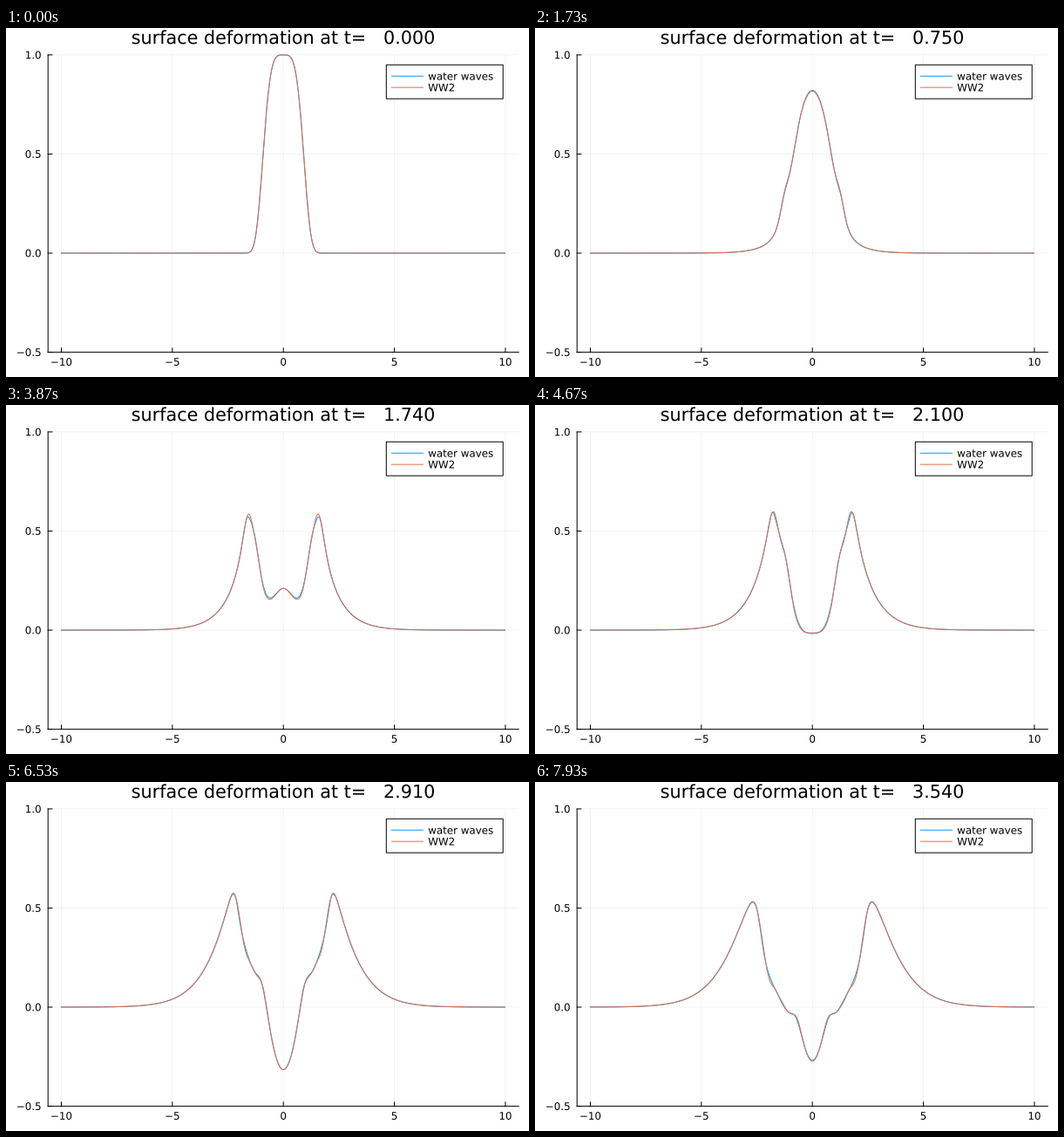
A matplotlib script for the animation above (8 s loop, 600 by 400 pixels).

```python
import numpy as np
import matplotlib.pyplot as plt
from matplotlib.animation import FuncAnimation
from matplotlib.patches import PathPatch, Rectangle
from matplotlib.textpath import TextPath

# ---- Wave models: depth 1, gravity 1, nonlinearity EPS ----
N, L, EPS = 1024, 10.0, 0.25
DT, STEPS, FRAMES = 0.01, 3, 120

grid = -L + 2 * L / N * np.arange(N)
k = 2 * np.pi * np.fft.fftfreq(N, 2 * L / N)
keep = (np.abs(k) < np.abs(k).max() * 2 / 3).astype(float)
k_safe = np.where(k == 0, 1, k)
ddx = 1j * k * keep
dtn = k * np.tanh(k) * keep
rect = np.minimum(1, 1 / np.abs(0.1 * k_safe))  # smoothing of high modes


def op(symbol, f):
    return np.fft.ifft(symbol * np.fft.fft(f)).real


def conjugate(depth):
    return np.where(k == 0, 0, -1j * keep / np.tanh(k_safe * depth))


def bell(x):
    return np.exp(-x ** 4)


def surface_x(y):
    return grid + op(conjugate(1 + y.mean()), y)


def full_rhs(state):
    """Full water waves in conformal variables."""
    y, phi = state
    depth = 1 + y.mean()
    conj = conjugate(depth)
    y_xi = op(ddx, y)
    x_xi = 1 + op(ddx * conj, y)
    phi_xi = op(ddx, phi)
    phi_n = op(k * np.tanh(k * depth) * keep, phi)
    jac = x_xi ** 2 + y_xi ** 2
    b = phi_n / jac
    a = op(conj, b)
    y_t = a * y_xi + b * x_xi
    phi_t = -y + a * phi_xi + 0.5 * (phi_n ** 2 - phi_xi ** 2) / jac
    return np.array([op(keep, y_t), op(keep, phi_t)])


def quadratic_rhs(state):
    """Second-order expansion of the water waves system."""
    zeta, psi = state
    smooth = op(rect, zeta)
    psi_x, psi_n = op(ddx, psi), op(dtn, psi)
    zeta_t = psi_n - EPS * (op(ddx, smooth * psi_x) + op(dtn, smooth * psi_n))
    psi_t = -zeta - EPS / 2 * op(rect * keep, psi_x ** 2 - psi_n ** 2)
    return np.array([zeta_t, psi_t])


def rk4(rhs, s):
    a = rhs(s)
    b = rhs(s + DT / 2 * a)
    c = rhs(s + DT / 2 * b)
    d = rhs(s + DT * c)
    return s + DT / 6 * (a + 2 * b + 2 * c + d)


def solve(rhs, height):
    state = np.array([height, np.zeros(N)])
    out = [height]
    for _ in range(FRAMES - 1):
        for _ in range(STEPS):
            state = rk4(rhs, state)
        out.append(state[0])
    return out


y0 = EPS * bell(grid)
for _ in range(60):
    y0 = EPS * bell(surface_x(y0))

full = [(surface_x(y), y / EPS) for y in solve(full_rhs, y0)]
quadratic = solve(quadratic_rhs, bell(grid))

# ---- Stage, drawn in pixels with y measured from the top ----
W, H = 600, 400
LEFT, RIGHT, TOP, BOTTOM = 48.2, 588.2, 30.87, 371.61
BLUE, ORANGE = "#009AFA", "#E36F47"
SMALL, LARGE = 11.853, 20.74

fig = plt.figure(figsize=(W / 100, H / 100), dpi=100, facecolor="white")
ax = fig.add_axes([0, 0, 1, 1])
ax.set_xlim(0, W)
ax.set_ylim(0, H)
ax.axis("off")


def px(x):
    return LEFT + (x + 10.6) / 21.2 * (RIGHT - LEFT)


def py(y):
    return BOTTOM - (y + 0.5) / 1.5 * (BOTTOM - TOP)


def line(xs, ys, color="black", width=1.0, **kw):
    # widths are in pixels
    return ax.plot(xs, H - np.asarray(ys), color=color, lw=width * 0.72,
                   snap=False, **kw)[0]


def text_path(x, base, s, size):
    return TextPath((x, H - base), s, size=size, prop={"family": "DejaVu Sans"})


def text(x, base, s, size=SMALL):
    patch = PathPatch(text_path(x, base, s, size), fc="black", lw=0, zorder=6)
    return ax.add_patch(patch)


def advance(s):
    return SMALL * sum({"−": 0.838, ".": 0.318}.get(c, 0.636) for c in s)


for v in (-10, -5, 0, 5, 10):
    x = px(v)
    label = str(v).replace("-", "−")
    line([x, x], [TOP, BOTTOM], width=0.5, alpha=0.1)
    line([x, x], [BOTTOM, BOTTOM - 4.72])
    text(x - advance(label) / 2, 386.9, label)

for v in (-0.5, 0.0, 0.5, 1.0):
    y = py(v)
    label = str(v).replace("-", "−")
    line([LEFT, RIGHT], [y, y], width=0.5, alpha=0.1)
    line([LEFT, LEFT + 4.72], [y, y])
    text(40.6 - advance(label), y + 4.32, label)

line([LEFT, RIGHT], [BOTTOM, BOTTOM])
line([LEFT, LEFT], [TOP, BOTTOM])

full_line = line([], [], BLUE, zorder=3)
quad_line = line([], [], ORANGE, zorder=4)

ax.add_patch(Rectangle((436.3, H - 81.1), 133.9, 38.88, fc="white", ec="black",
                       lw=0.72, snap=False, zorder=5))
for y, color, label in ((55.18, BLUE, "water waves"), (68.14, ORANGE, "WW2")):
    line([442.4, 478.4], [y, y], color, zorder=6)
    text(484.2, y + 4.32, label)

title = text(143.7, 18.14, "t", LARGE)


def update(i):
    x, z = full[i]
    full_line.set_data(px(x), H - py(z))
    quad_line.set_data(px(grid), H - py(quadratic[i]))
    t = i * STEPS * DT
    title.set_path(text_path(143.7, 18.14,
                             f"surface deformation at t=   {t:.3f}", LARGE))
    return full_line, quad_line, title


anim = FuncAnimation(fig, update, frames=FRAMES, interval=8000 / FRAMES,
                     repeat=True, repeat_delay=0, blit=False)
plt.show()
```
